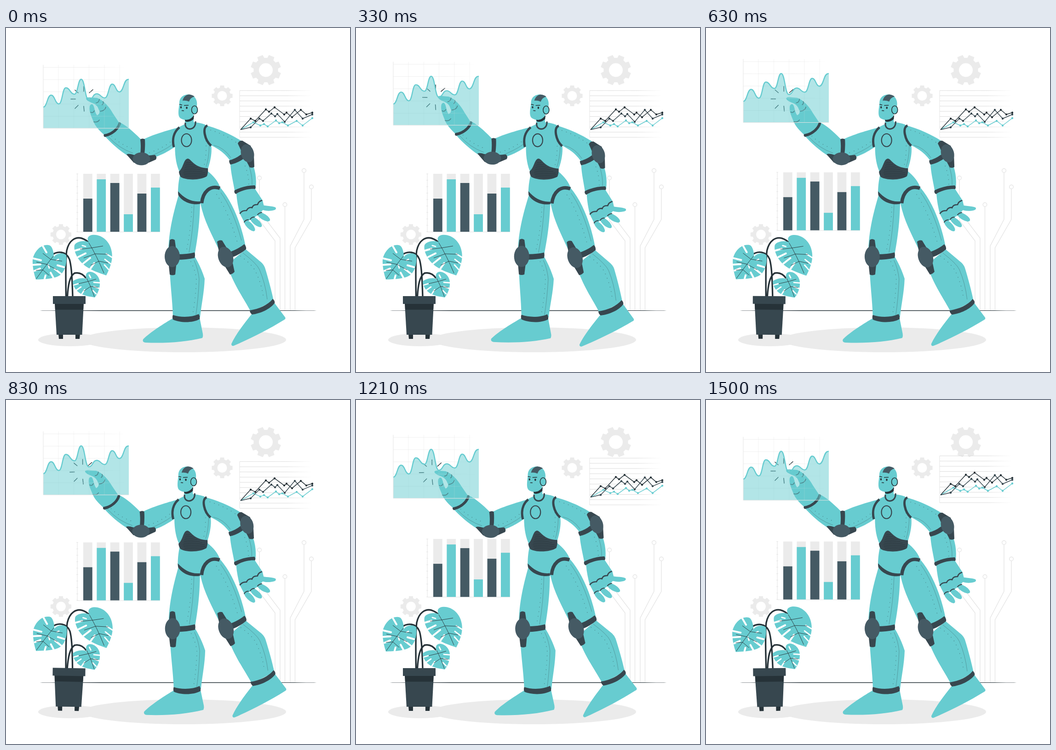
Recreate the animation shown at these times as an HTML page. Size 748 by 748 pixels, loop 1540 ms.

```html
<!DOCTYPE html>
<html lang="en">
<head>
<meta charset="utf-8">
<title>Robot and charts</title>
<style>
html,body{margin:0;width:100%;height:100%;overflow:hidden;background:#fff}
svg{display:block;width:100vw;height:100vh}
.t{fill:#67ccd0}.d{fill:#37474f}.m{fill:#455a64}.k{fill:#263238}.g{fill:#ebebeb}
.grid{fill:none;stroke:#e4e4e4;stroke-width:1}
.ln{fill:none;stroke-width:1.5;stroke-linejoin:round}
.seam{fill:none;stroke:#263238;stroke-width:.7;opacity:.45}
.dots{fill:none;stroke:#263238;stroke-width:1.6;stroke-linecap:round;stroke-dasharray:.1 10;opacity:.4}
.band{fill:none;stroke:#37474f;stroke-width:5}
.joint{fill:none;stroke:#37474f;stroke-width:2.6;stroke-linecap:round}
.stem{fill:none;stroke:#263238;stroke-width:3.4}
.vein{fill:none;stroke:#263238;stroke-width:.9}
.slit{fill:none;stroke:#fff;stroke-linecap:round;stroke-width:4}
.slit.thin{stroke-width:2.8}
</style>
</head>
<body>
<svg viewBox="0 0 748 748">
<defs>
<linearGradient id="fadeA" gradientUnits="userSpaceOnUse" x1="81" y1="0" x2="262" y2="0">
<stop offset=".65" stop-color="#e4e4e4"/><stop offset="1" stop-color="#e4e4e4" stop-opacity="0"/></linearGradient>
<linearGradient id="fadeB" gradientUnits="userSpaceOnUse" x1="508" y1="0" x2="666" y2="0">
<stop offset=".65" stop-color="#dcdcdc"/><stop offset="1" stop-color="#dcdcdc" stop-opacity="0"/></linearGradient>
</defs>

<ellipse class="g" cx="387" cy="678" rx="222" ry="27"/>
<ellipse class="g" cx="139" cy="678" rx="69" ry="14"/>
<g fill="none" stroke="#e6e6e6" stroke-width="1.4">
<path d="M551,331V418L585,463V614M541,385L596,457V614M606.500,388V614M648,315V416L618,474V614M664,350V416L628.500,478V614"/>
<circle cx="551" cy="326" r="4.300"/><circle cx="606.500" cy="384" r="4.300"/>
<circle cx="648" cy="310" r="4.300"/><circle cx="664" cy="345.500" r="4.300"/>
</g>
<g id="gears" class="g"></g>
<ellipse class="k" cx="374.500" cy="614.500" rx="301" ry=".8"/>
<g id="bars"></g>
<g id="lines"></g>

<g id="plant">
<path class="stem" d="M130.500,584C130,550 129,505 132,484C137,461 151,454 164,457Q174,460 181,468"/>
<path class="stem" d="M145,584C144,550 143,520 138,503C131,485 112,484 99,494"/>
<path class="stem" d="M133.500,584C135,560 138,540 149,533Q164,530 174,544"/>
<path class="t" d="M180,466C174,461 153,463 149,472C146,485 156,503 167,513C183,527 204,533 218,538C226,522 233,505 230,487C227,464 207,447 187,450C178,452 175,458 180,466Z"/>
<path class="t" d="M104,498C104,486 100,472 92,472C75,470 61,487 58,503C57,518 61,535 65,547C82,546 106,546 118,537C130,527 133,508 131,494C124,487 109,490 104,498Z"/>
<path class="t" d="M175,546C166,541 150,546 145,551C145,561 153,573 163,578C172,583 184,584 193,586C200,577 205,565 204,552C203,540 193,530 182,530C174,531 172,537 175,546Z"/>
<path class="slit" d="M150,484L164,480M157,498L173,490M168,512L183,500M183,524L192,511
M59,501L76,505M59,515L75,514M62,528L74,523M80,474L88,488M126,520L112,516M119,534L106,524M103,543L97,532M84,545L86,538"/>
<path class="slit thin" d="M231,499L218,491M228,513L215,503M223,525L214,515M147,559L157,556M153,570L163,563M165,578L171,569M204,554L191,553M202,566L191,562M196,578L189,571
M166,473L173,475M92,515L94,522M110,505L114,503M181,537L184,543"/>
<path class="vein" d="M180,467Q197,495 213,533M187,478L211,474M194,491L221,492M202,507L222,511M187,478L161,481M194,491L169,500M202,507L184,516
M103,496Q86,517 66,545M97,503L80,490M89,514L66,509M80,526L65,527M97,503L122,507M89,514L111,526M80,526L94,538
M175,544Q184,560 192,584M179,551L196,546M184,562L200,564M179,551L158,556M184,562L169,572"/>
<path class="k" d="M114,665h10v11h-9zM151,665h10l-1,11h-9z"/>
<path class="d" d="M106,599H169L165.500,667H110Z"/>
<path class="k" d="M106.500,599H168.500L168,612.500H107Z"/>
<path class="d" d="M102,583H173V600H102Z"/>
</g>

<g id="robot">
<!-- legs -->
<path class="t" d="M378,354C366,395 353,440 353,492L410,495C414,470 422,430 422,374Z"/>
<path class="seam" d="M409,383Q407,440 398,488"/><path class="dots" d="M404,390Q402,440 392,486"/>
<path class="t" d="M355,503L411,498Q424,520 432,545C431,575 425,600 422,629L363,629C362,590 356,550 355,503Z"/>
<path class="seam" d="M409,505Q418,525 420,546Q418,590 413,624"/><path class="dots" d="M402,508Q413,530 414,548Q412,590 406,622"/>
<path class="t" d="M363,631C345,642 315,660 298,677Q296,683 303,684C345,686 390,683 427,674Q429,670 428,665L421,630C405,640 378,640 363,631Z"/>
<path class="d" d="M363,624C380,630 405,629 419,622Q422,627 421,633C405,642 378,641 363,634Q361,628 363,624Z"/>
<path class="d" d="M372,492Q395,492 410,488Q412,494 410,500Q392,504 372,504Z"/>
<path class="d" d="M356,461Q361,457 367,461L372,497L368,536Q362,539 356,536L352,497Z"/>
<ellipse class="m" cx="361.500" cy="497" rx="16.500" ry="23"/>

<path class="t" d="M423,382C426,352 450,338 466,347C493,378 512,428 521,475L480,503L462,480C448,450 430,418 423,382Z"/>
<path class="seam" d="M467,358Q494,395 512,462"/><path class="dots" d="M458,362Q484,400 503,466"/>
<path class="t" d="M483,513L521,481L552,507Q560,513 563,521C571,547 577,570 582,593L533,618C515,585 500,565 486,530Z"/>
<path class="seam" d="M515,489Q545,512 551,525Q564,555 568,590"/><path class="dots" d="M510,496Q536,515 543,530Q557,560 560,588"/>
<path class="t" d="M535,621C553,620 575,611 583,597L607,629Q609,633 604,635C570,656 530,676 495,691Q490,692 490,687C500,665 520,640 535,621Z"/>
<path class="d" d="M530,614C550,611 570,602 580,589Q585,593 584,598C575,611 553,621 535,623Q530,619 530,614Z"/>
<path class="d" d="M487,487Q506,480 518,470Q523,475 522,481Q508,493 491,499Z"/>
<path class="d" d="M459,465Q463,460 470,462L489,493L497,530Q493,535 487,536L466,502Z"/>
<ellipse class="m" cx="477.500" cy="498" rx="16" ry="23" transform="rotate(-19 477.500 498)"/>

<!-- pelvis and torso -->
<path class="t" d="M379,316L437,310C452,322 462,334 467,350C450,342 426,352 424,382C405,386 385,376 374,360C374,342 376,330 379,316Z"/>
<path class="d" d="M374,355C387,370 404,379 422,377V382.500C403,386 382,377 374.500,363Z"/>
<path class="band" style="stroke-width:7.500" d="M425.500,381C428,356 444,341 465,348.500"/>
<path class="t" d="M376,216C353,222 318,232 297,243L303,283C325,285 350,270 368,258Z"/>
<path class="seam" d="M310,280Q342,268 362,253"/><path class="dots" d="M312,271Q340,262 361,245"/>
<path class="t" d="M433,211C470,221 502,238 518,250L513,280L490,292C475,270 460,262 444,254Z"/>
<path class="seam" d="M452,255Q474,260 489,282"/><path class="dots" d="M445,222Q478,232 502,250"/>
<path class="t" d="M375,216C364,240 365,290 378,314L437,312C447,285 448,265 446,254L433,210Q410,202 393,207Q383,212 375,216Z"/>
<path class="seam" d="M442,256Q441,285 435,302"/><path class="dots" d="M435,246Q436,280 431,298"/>
<path class="band" d="M377,216C364,227 361,243 365,259"/>
<path class="band" d="M438,212C426,216 432,244 446,256"/>
<ellipse cx="392.500" cy="244" rx="11" ry="14" fill="none" stroke="#37474f" stroke-width="2.200"/>
<path class="d" d="M376,312C386,304 386,285 395,284C403,284 408,304 439,305Q440,313 437,322C425,331 393,332 380,324Q376,318 376,312Z"/>
<g id="ribs" class="seam" style="stroke-width:.9;opacity:.7"></g>

<!-- head -->
<path class="t" d="M389,198L408,190V204L413,211Q402,222 389,212Z"/>
<path class="k" d="M388,198C397,202 404,196 409,189L408,198C402,204 394,205 390,203Z"/>
<path class="band" style="stroke-width:3.200" d="M390,206C387,225 414,224 412,203"/>
<path class="t" d="M377,165C376,150 387,144 398,144.500C411,146 417,157 415,170C413,184 407,190 402,196C394,202 385,200 379,196C374,192 374,183 377,165Z"/>
<path class="m" d="M384,158C386,150 391,145 398,144.500Q405,145 410,149Q401,151 398,160Q391,157 384,158Z"/>
<ellipse class="t" cx="410" cy="178" rx="6.500" ry="8.800" stroke="#263238" stroke-width="1.600"/>
<ellipse class="k" cx="380.500" cy="172.500" rx="1.700" ry="2.400"/><ellipse class="k" cx="393" cy="173.500" rx="1.800" ry="2.500"/>
<path class="vein" style="stroke-width:1.500" d="M377,166L383,167.500M387,168.500L397,168M382,179.500L387,180"/>

<!-- raised arm -->
<path class="t" d="M247,205C262,212 280,228 297,246L290,286Q270,282 262,276C245,265 228,250 214,234Z"/>
<path class="seam" d="M222,236Q246,262 276,272"/><path class="dots" d="M230,235Q252,256 280,264"/>
<path class="d" d="M292,242Q297,239 302,242Q303,258 301,274H292Q294,258 292,242Z"/>
<path class="d" d="M262,275Q266,272 278,276L312,277L324,276Q329,280 326,286L310,293H278Z"/>
<ellipse class="m" cx="294.500" cy="284.500" rx="19" ry="14"/>
<path class="t" d="M174,154C174,151 178,150 184,151L198,152C212,157 225,172 232,185L246,206C241,220 228,231 214,233C205,225 194,214 190,203C186,192 180,182 182,170Q184,165 188,166C193,170 192,182 198,190C203,188 205,182 202,178Q199,168 190,164Q176,159 174,154Z"/>
<path class="joint" style="stroke-width:1.700" d="M196,163Q202,162 203,155M205,181Q215,180 217,172M184,183Q189,186 192,180M191,204Q199,206 203,200M209,167Q213,164 211,160"/>
<path class="d" d="M213,231C228,229 241,219 245,205Q249,204 250,208C246,222 231,234 215,237Q211,235 213,231Z"/>
<path class="joint" style="stroke-width:1.500;stroke:#263238" d="M141,154.500H151M150,135L157,141M169,127V138M181,141L189,134M150,175L157,168M169,170L170,181"/>

<!-- lowered arm -->
<path class="t" d="M488,296L516,281L538,300C543,315 545,330 543,347L498,358C494,335 489,315 488,296Z"/>
<path class="seam" d="M527,296Q536,320 535,341"/><path class="dots" d="M520,300Q528,320 528,341"/>
<path class="d" d="M485,288Q500,284 511,275Q517,279 517,284Q503,294 488,297Q485,293 485,288Z"/>
<path class="d" d="M504,251Q507,244 514,245L532,256L539,278L540,302Q536,305 530,303L515,275Z"/>
<ellipse class="m" cx="525" cy="272.500" rx="14" ry="20" transform="rotate(-16 525 272.500)"/>
<path class="t" d="M501,360C512,353 528,349 541,349L558,375L562,392L549,406L533,416L519,424L508,403C505,390 502,376 501,360Z"/>
<path class="t" d="M554,384C566,388 576,386 586,390Q589,394 583,396C572,399 560,398 550,392Z"/>
<g id="fingers" class="t"></g>
<path class="joint" d="M509,403Q513,397 521,397M523,397Q526,390 534,390M535,391Q537,384 545,384M547,384Q549,377 556,375"/>
<path class="joint" style="stroke-width:2" d="M518,422Q521,417 527,417M531,416Q534,411 540,411M547,406Q550,402 556,401"/>
<path class="d" d="M497,353C510,346 527,342 541,342Q544,346 542,350C527,349 510,354 500,361Q495,358 497,353Z"/>
</g>

<g id="area"></g>
</svg>
<script>
const $ = id => document.getElementById(id);
const path = (d, attr) => `<path d="${d}" ${attr}/>`;
const range = n => [...Array(n).keys()];

function gear(x, y, r, hole, turn) {
  const pt = (a, q) => `${(x + q * Math.cos(a)).toFixed(1)},${(y + q * Math.sin(a)).toFixed(1)}`;
  const pts = range(8).flatMap(i => {
    const a = turn + i * Math.PI / 4;
    return [pt(a - .27, r * .8), pt(a - .19, r), pt(a + .19, r), pt(a + .27, r * .8)];
  });
  return path(`M${pts.join('L')}ZM${x - hole},${y}a${hole},${hole} 0 1 0 ${2 * hole},0a${hole},${hole} 0 1 0 ${-2 * hole},0Z`, 'fill-rule="evenodd"');
}
$('gears').innerHTML = gear(565, 91.5, 33.5, 15, .39) + gear(470, 147.5, 23, 10.5, 0) + gear(119.5, 449, 23, 10.5, 0);

$('bars').innerHTML = path('M155,317V443.5H335', 'class="grid"')
  + path(range(10).map(i => `M153,${317 + i * 14}h4`).join(''), 'class="grid"')
  + [371, 329, 337, 405, 360, 347].map((y, i) => {
    const x = 168 + i * 29.4;
    return `<rect class="g" x="${x}" y="317" width="19.7" height="126"/>`
      + `<rect class="${i % 2 ? 't' : 'm'}" x="${x}" y="${y}" width="19.7" height="${443 - y}"/>`;
  }).join('');

const series = [
  ['#67ccd0', '510,221 538,205 553,212 561,209 569,214 587,201 594,207 601,205 613,212 632,202 645,212 666,196'],
  ['#37474f', '510,221 532,216 551,197 559,202 577,186 585,192 590,187 606,204 628,178 645,197 666,188'],
  ['#263238', '510,221 532,197 542,202 565,177 572,182 584,172.5 605,188 610,184 622,194 641,178 653,188 666,184']
];
$('lines').innerHTML = path(range(10).map(i => `M508,${(136 + i * 11.3).toFixed(1)}H666`).join(''), 'fill="none" stroke="url(#fadeB)"')
  + path('M508,136V238', 'class="grid"')
  + series.map(([color, pts]) => `<polyline class="ln" stroke="${color}" points="${pts}"/>`
    + pts.split(' ').slice(1).map(p => {
      const [x, y] = p.split(',');
      return `<circle cx="${x}" cy="${y}" r="2.2" fill="${color}"/>`;
    }).join('')).join('');

// Peaks and valleys joined with level tangents
const peaks = [[98, 146], [115, 165], [130, 130], [149, 144], [163.5, 111.5], [180, 157], [197, 143], [215, 152], [231, 122], [246.5, 139], [265, 112], [267, 111.5]];
let wave = 'M81,172', px = 81, py = 172;
for (const [x, y] of peaks) {
  const mx = (px + x) / 2;
  wave += `C${mx},${py} ${mx},${y} ${x},${y}`;
  px = x; py = y;
}
$('area').innerHTML = path(range(5).map(i => `M81,${85.5 + i * 26.6}H262`).join(''), 'fill="none" stroke="url(#fadeA)" opacity=".55"')
  + path(range(5).map(i => `M${114 + i * 33.3},80V218`).join(''), 'class="grid" opacity=".4"')
  + path(wave + 'V218H81Z', 'class="t" opacity=".5"')
  + path(wave, 'fill="none" stroke="#67ccd0" stroke-width="2.4"')
  + path('M81,80V218H267', 'class="grid"');

$('ribs').innerHTML = range(9).map(i => {
  const y = 292 + i * 3.8, w = Math.min(28, 6 + i * 3.6), x = 396 + i * 1.5;
  return path(`M${x - w * .7},${y}Q${x},${y + 3} ${x + w},${y}`, '');
}).join('');

$('fingers').innerHTML = [[529.5, 429.5, 46], [543.5, 421.5, 40], [560, 410.5, 31]]
  .map(([x, y, a]) => `<ellipse cx="${x}" cy="${y}" rx="16" ry="6.5" transform="rotate(${a} ${x} ${y})"/>`).join('');

const LOOP = 1540, CYCLE = 1500, FPS = 24;
const phase = ms => Math.max(0, ms) % CYCLE / CYCLE;
const lift = ms => -15 * (1 - Math.abs(1 - 2 * phase(ms)));
function sway(ms) {
  const p = phase(ms);
  return p < .25 ? 4 * p : p < .75 ? 2 - 4 * p : 4 * p - 4;
}
const shift = (id, y) => $(id).setAttribute('transform', `translate(0 ${y})`);
const turn = (id, deg, x, y) => $(id).setAttribute('transform', `rotate(${deg} ${x} ${y})`);

function draw(ms) {
  const t = Math.floor((ms % LOOP + 5) * FPS / 1000) * 1000 / FPS;
  shift('area', lift(t + 40) - lift(40));
  shift('bars', lift(t - 465));
  shift('lines', lift(t - 725));
  turn('robot', sway(t + 50) - sway(50), 391, 410);
  turn('plant', sway(t - 470), 145, 563);
}

const start = performance.now();
function tick() {
  draw(performance.now() - start);
  requestAnimationFrame(tick);
}
tick();
</script>
</body>
</html>
```
